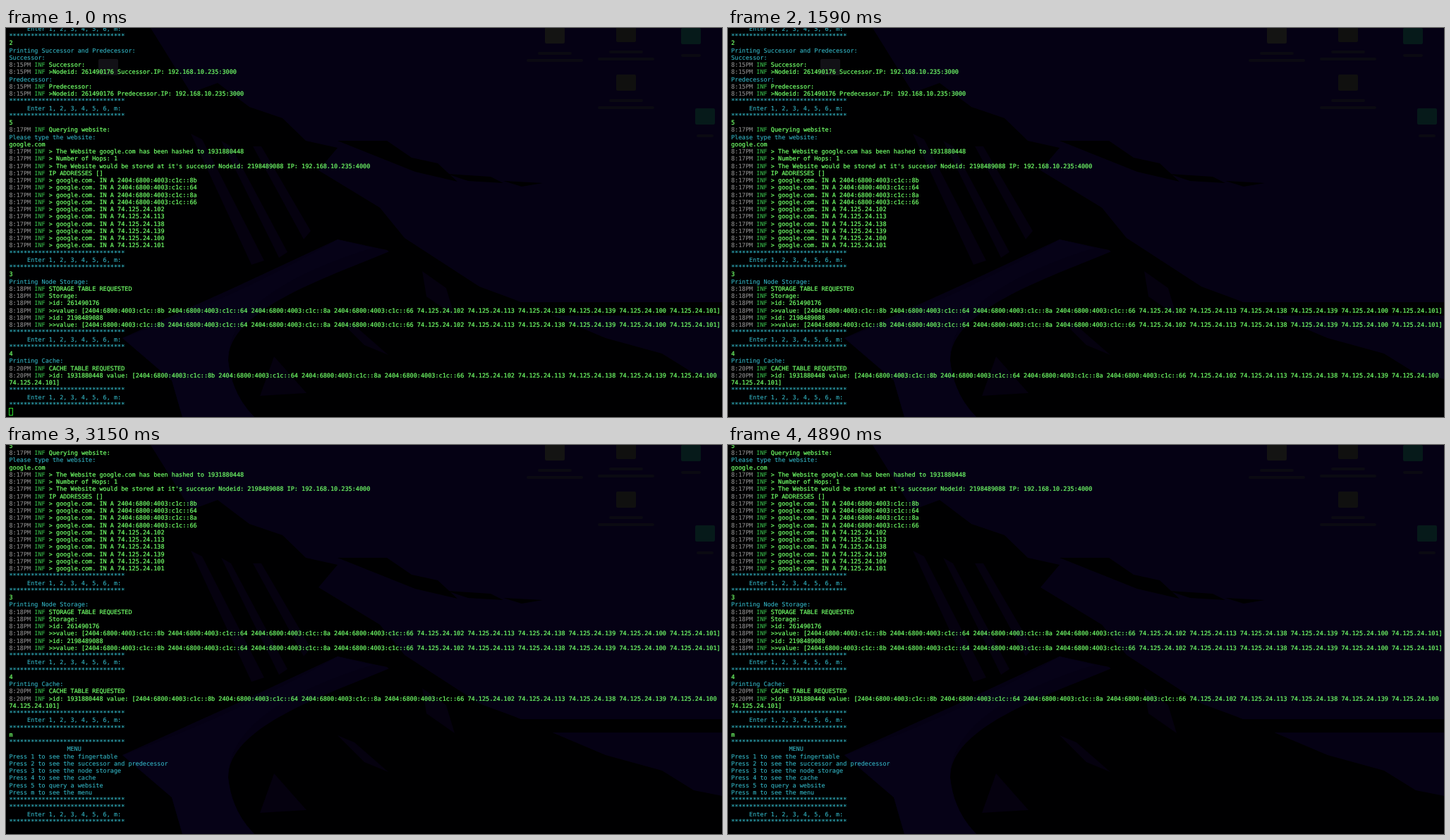
An HTML page that plays this animation: 1015x552 px, repeating every 5.28 s.

```html
<!DOCTYPE html>
<html lang="en">
<head>
<meta charset="utf-8">
<title>Terminal session</title>
<style>
  html, body { margin: 0; width: 100%; height: 100%; overflow: hidden; background: #050114; }
  svg, pre, #cursor { position: absolute; }
  svg { left: 0; top: 0; }
  pre {
    left: 4.5px; top: -3.1px; margin: 0;
    font: 8.5px/10.25px "DejaVu Sans Mono", monospace;
    text-rendering: geometricPrecision;
    color: #33b4c4; -webkit-text-stroke: .1px;
  }
  .time { color: #8c8c8c; }
  .level { color: #39bc4c; }
  .bright { color: #70ff68; -webkit-text-stroke: .22px; }
  #cursor { top: 539px; width: 6px; height: 11px; box-sizing: border-box; }
</style>
</head>
<body>
<svg width="1015" height="552" viewBox="0 0 1015 552">
  <g fill="#000001">
    <path d="M0 0H205L262 92L300 78L345 112L392 128L425 160L470 170L443 202L530 255L565 298L705 389H1015V408H640L540 315L470 300L320 370L165 440L235 500L250 552H0Z"/>
    <path d="M560 310C470 350 315 395 315 472Q320 520 352 552H1015V498L975 490L930 462L850 440L720 385L625 350Z"/>
    <path d="M470 160l70 0 35 24 37 8 28 26-60-14-50-20zM625 207l62 4 18 9-50-3zM705 217l56 3-30 5z"/>
  </g>
  <g fill="#05010f">
    <path d="M262 150l16 8 88 172-18 6zM305 160l14 8 80 150-12 8zM350 168l12 0 70 120-10 12z"/>
    <path d="M360 522l20-56 46 52zM470 412l24 10 48 42-34-14zM590 345l34 24 12 40-40-28z"/>
  </g>
  <path fill="#060217" d="M165 440Q320 385 470 300L520 312Q315 375 315 472Q320 520 352 552H250L235 500Z"/>
  <g id="icons"></g>
  <rect id="coveredIcon" x="131" y="44" width="28" height="23" rx="2" fill="#121116"/>
</svg>
<pre id="before"></pre>
<pre id="after"></pre>
<div id="cursor"></div>
<script>
const LOOP = 5280, TYPED = 2550, ENTERED = 2610, SCROLLED_ROWS = 13;
const CELL = 5.12, LEFT = 4;
const $ = id => document.getElementById(id);

const stars = '*'.repeat(32);
const prompt = [stars, '     Enter 1, 2, 3, 4, 5, 6, m:', stars];
const log = (time, ...messages) => messages.map(m => `${time}PM INF ${m}`);

const v6 = ['8b', '64', '8a', '66'].map(end => '2404:6800:4003:c1c::' + end);
const v4 = [102, 113, 138, 139, 100, 101].map(end => '74.125.24.' + end);
const addresses = [...v6, ...v4];
const stored = `>>value: [${addresses.join(' ')}]`;

const lines = [
  ...prompt.slice(1),
  '2', 'Printing Successor and Predecessor:',
  ...['Successor', 'Predecessor'].flatMap(name => [
    name + ':',
    ...log('8:15', name + ':', `>Nodeid: 261490176 ${name}.IP: 192.168.10.235:3000`)
  ]),
  ...prompt,
  '5', ...log('8:17', 'Querying website:'), 'Please type the website:', 'google.com',
  ...log('8:17',
    '> The Website google.com has been hashed to 1931880448',
    '> Number of Hops: 1',
    "> The Website would be stored at it's succesor Nodeid: 2198489088 IP: 192.168.10.235:4000",
    'IP ADDRESSES []',
    ...addresses.map(a => `> google.com. IN A ${a}`)),
  ...prompt,
  '3', 'Printing Node Storage:',
  ...log('8:18', 'STORAGE TABLE REQUESTED', 'Storage:',
    '>id: 261490176', stored, '>id: 2198489088', stored),
  ...prompt,
  '4', 'Printing Cache:',
  ...log('8:20', 'CACHE TABLE REQUESTED',
    `>id: 1931880448 value: [${addresses.slice(0, -1).join(' ')}`),
  addresses.at(-1) + ']',
  ...prompt
];

const menu = [
  'm', stars, ' '.repeat(16) + 'MENU',
  ...['1 to see the fingertable', '2 to see the successor and predecessor',
    '3 to see the node storage', '4 to see the cache', '5 to query a website',
    'm to see the menu'].map(item => 'Press ' + item),
  stars, ...prompt
];

const span = (kind, text) => `<span class="${kind}">${text}</span>`;

function colour(line) {
  const entry = line.match(/^(\d+:\d\dPM) (INF) (.*)$/);
  if (entry) {
    return ['time', 'level', 'bright'].map((kind, i) => span(kind, entry[i + 1])).join(' ');
  }
  return /^(\d|m$|google)/.test(line) ? span('bright', line) : line;
}

const render = rows => rows.map(colour).join('\n');
const typedRow = '\n' + colour('m');
const idleText = render(lines);
$('after').innerHTML = render([...lines, ...menu].slice(SCROLLED_ROWS));

// Dimmed desktop icons: centre x, centre y, colour, label width
const icons = [
  [778, 10, '#141413', 80], [879, 8, '#10100f', 80], [971, 11, '#061a1a', 28],
  [879, 77, '#10100f', 80], [991, 125, '#061a1a', 24]
];
$('icons').innerHTML = icons.map(([x, y, fill, label]) => {
  const bar = (w, dy) => `<rect x="${x - w / 2}" y="${y + dy}" width="${w}" height="4" rx="2" fill="#0b0a12"/>`;
  const labels = label > 40 ? bar(48, 24) + bar(label, 34) : bar(label, 26);
  return `<rect x="${x - 14}" y="${y - 11}" width="28" height="23" rx="2" fill="${fill}"/>${labels}`;
}).join('');

// Cursor fill opacity as [time, value] keys
const blink = [
  [0, 0], [780, 0], [900, 1], [1300, 1], [1410, 0], [1769, 0], [1770, 1],
  [2940, 1], [3150, 0], [3510, 0], [3540, 1], [3900, 1], [4140, 0],
  [4290, 0], [4440, 1], [4889, 1], [4890, 0], [LOOP, 0]
];

function opacityAt(t) {
  const i = blink.findIndex(([time]) => time > t);
  const [t0, a] = blink[i - 1], [t1, b] = blink[i];
  return a + (b - a) * (t - t0) / (t1 - t0);
}

let shown;
function frame() {
  const t = performance.now() % LOOP;
  const typing = t >= TYPED && t < ENTERED;
  const entered = t >= ENTERED;

  const state = entered ? 'entered' : typing ? 'typing' : 'idle';
  if (state !== shown) {
    shown = state;
    $('before').innerHTML = idleText + (typing ? typedRow : '');
    $('after').style.visibility = entered ? 'visible' : 'hidden';
    for (const id of ['before', 'coveredIcon']) {
      $(id).style.visibility = entered ? 'hidden' : 'visible';
    }
  }

  const cursor = $('cursor').style;
  cursor.left = LEFT + (typing ? CELL : 0) + 'px';
  cursor.border = t < 780 ? '1px solid #2bd92b' : 'none';
  cursor.background = `rgba(45, 255, 42, ${opacityAt(t)})`;
  requestAnimationFrame(frame);
}
frame();
</script>
</body>
</html>
```
